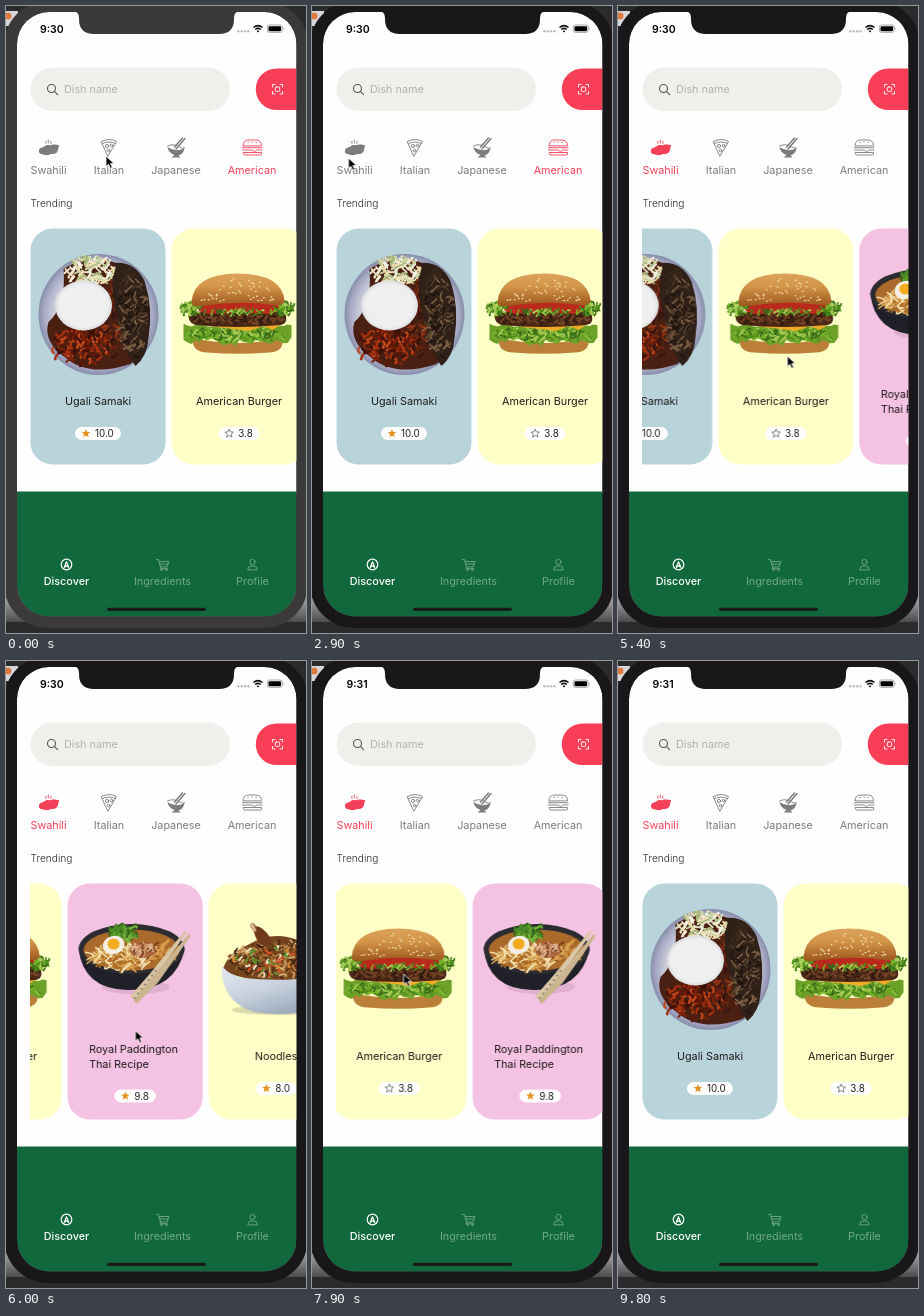
Write an HTML page that moves like this. It is 300 by 627 pixels and loops after 9.9 s.

```html
<!DOCTYPE html>
<html lang="en">
<head>
<meta charset="utf-8">
<title>Dish finder</title>
<style>
html, body { margin: 0; width: 100%; height: 100%; overflow: hidden; background: #2b2a2d; }
svg { display: block; width: 300px; height: 627px; }
text { font: 400 10.8px Inter, Roboto, sans-serif; }
.mid { text-anchor: middle; }
.small { font-size: 9.8px; }
.head { font-size: 10.2px; font-weight: 300; }
.line { fill: none; stroke: currentColor; stroke-width: .9; stroke-linecap: round; stroke-linejoin: round; }
.solid { fill: currentColor; }
.cat { color: #7c7c7c; }
.cat text, .tab text { fill: currentColor; }
.tab { color: #72a78a; }
.tab.on { color: #fff; }
.tab.on text { font-weight: 500; }
.clock { font-size: 10.5px; font-weight: 600; }
.anim { animation: 9900ms linear infinite; }
#body { animation-name: wake; animation-timing-function: step-end; }
#swahili { animation-name: pick; animation-timing-function: step-end; }
#american { animation-name: drop; animation-timing-function: step-end; }
#before { animation-name: before; animation-timing-function: step-end; }
#after { animation-name: after; animation-timing-function: step-end; }
#knob { animation-name: knob; animation-timing-function: step-end; }
#cards { animation-name: scroll; animation-timing-function: ease-in-out; }
#cursor { animation-name: point; animation-timing-function: ease-in-out; }
@keyframes wake { 0% { fill: #3b393a; } 5.05%, 100% { fill: #19171a; } }
@keyframes pick { 0% { color: #7c7c7c; } 31.31%, 100% { color: #f5405a; } }
@keyframes drop { 0% { color: #f5405a; } 31.31%, 100% { color: #7c7c7c; } }
@keyframes before { 0% { opacity: 1; } 75.76%, 100% { opacity: 0; } }
@keyframes after { 0% { opacity: 0; } 75.76%, 100% { opacity: 1; } }
@keyframes knob { 0% { opacity: 0; } 83.84% { opacity: 1; } 88.89%, 100% { opacity: 0; } }
@keyframes scroll {
  0%, 51.52% { transform: translateX(0); animation-timing-function: ease-in; }
  54.55% { transform: translateX(-65px); animation-timing-function: ease-out; }
  64.65%, 71.72% { transform: translateX(-294px); }
  76.77% { transform: translateX(-160px); animation-timing-function: ease-out; }
  79.8% { transform: translateX(-146px); animation-timing-function: linear; }
  85.86% { transform: translateX(-33px); animation-timing-function: ease-out; }
  90.9%, 100% { transform: translateX(0); }
}
@keyframes point {
  0%, 4% { transform: translate(100px, 150px); }
  25.25%, 33.33% { transform: translate(36.5px, 152px); }
  46.46%, 51.52% { transform: translate(235px, 350px); animation-timing-function: ease-in; }
  54.55% { transform: translate(169.5px, 350px); animation-timing-function: ease-out; }
  57.58% { transform: translate(110px, 357px); }
  63.64%, 67.68% { transform: translate(148.5px, 382px); }
  71.72% { transform: translate(66px, 330px); }
  76.77% { transform: translate(140px, 320px); }
  79.8% { transform: translate(91.5px, 313px); animation-timing-function: linear; }
  85.86% { transform: translate(168px, 336px); animation-timing-function: ease-out; }
  90.9% { transform: translate(196px, 330px); }
  96.97%, 100% { transform: translate(262px, -25px); }
}
</style>
</head>
<body>
<svg viewBox="0 0 300 627">
  <defs>
    <clipPath id="screen"><rect x="11" y="6" width="279.5" height="604.5" rx="32"/></clipPath>
    <clipPath id="list"><rect x="24.5" y="222" width="266" height="238"/></clipPath>
    <linearGradient id="shade" x2="0" y2="1"><stop offset=".1" stop-color="#b5b4b6"/><stop offset="1" stop-color="#4c4b4e"/></linearGradient>
    <linearGradient id="bun" x2="0" y2="1"><stop stop-color="#dca35c"/><stop offset=".4" stop-color="#d29548"/><stop offset="1" stop-color="#9c551d"/></linearGradient>
    <linearGradient id="bowl" x2=".7" y2="1"><stop stop-color="#e4eaf2"/><stop offset=".5" stop-color="#c9d3df"/><stop offset="1" stop-color="#98a5b8"/></linearGradient>
    <radialGradient id="plate"><stop offset=".75" stop-color="#c9cad9"/><stop offset=".9" stop-color="#a9abc6"/><stop offset="1" stop-color="#878daa"/></radialGradient>
    <radialGradient id="mound"><stop offset=".85" stop-color="#efefef"/><stop offset="1" stop-color="#dcdcdf"/></radialGradient>
  </defs>

  <rect width="300" height="627" fill="#2b2a2d"/>
  <path d="M0 5H12V20H0Z" fill="#d8d7d9"/>
  <path d="M0 585H300V616H0Z" fill="url(#shade)"/>
  <circle cx="2" cy="10" r="3.5" fill="#e0793f"/>
  <g id="body" class="anim">
    <rect x="-2" y="-5" width="304" height="627" rx="44"/>
  </g>

  <g clip-path="url(#screen)">
    <rect x="11" y="6" width="280" height="482" fill="#fffefe"/>
    <rect x="24.5" y="61.5" width="199.5" height="43.5" rx="21.75" fill="#f0efeb"/>
    <g class="line" style="color:#555;stroke-width:1.1"><circle cx="45.5" cy="82.5" r="4"/><path d="M48.6 85.6 51.6 88.6"/></g>
    <text x="58" y="87" fill="#b3b1af">Dish name</text>
    <path d="M292 62.5H270.5a20.75 20.75 0 0 0 0 41.5H292Z" fill="#f93f57"/>
    <g class="line" style="color:#fff">
      <path d="M266.5 81v-2.5h2.5M274 78.5h2.5V81M276.5 85.5v2.5H274M269 88h-2.5v-2.5"/>
      <rect x="269.3" y="81" width="4.4" height="4.5" rx="1"/>
    </g>

    <g id="swahili" class="cat anim">
      <path class="solid" d="M33 144c1-3 4-2 6-4 2-2 4 0 6-1 4-1 5 0 8 0 0 2-1 3-1 5-1 4-4 4-7 4-4 2-7 1-9 0-3 0-3-2-3-4Z"/>
      <path class="line" d="M40 137.500q-1.200-1.200 0-2.300M42.500 137q-1.200-1.500 0-3M45 137.500q-1.200-1.200 0-2.300"/>
      <text class="mid" x="42.500" y="168">Swahili</text>
    </g>
    <g class="cat">
      <path class="line" d="M95.500 135.500Q103 131.500 110.500 135.500L102 150Z M96.500 137.500Q103 134.500 109.500 137.500"/>
      <g class="line"><circle cx="101" cy="140" r="1.600"/><circle cx="105.500" cy="139.500" r="1.300"/><circle cx="102.500" cy="144.500" r="1.300"/></g>
      <text class="mid" x="103" y="168">Italian</text>
    </g>
    <g class="cat">
      <path class="line" style="stroke-width:1.500" d="M179 132.500 170 143M176.500 132 168.500 141"/>
      <path class="line" d="M161.500 140q6-3 12 1 4 2 5 1"/>
      <path class="solid" d="M161.500 141q8 6 17 1-1 6-6 7.500l2 2h-9l3-2.500q-6-2-7-8Z"/>
      <text class="mid" x="170" y="168">Japanese</text>
    </g>
    <g id="american" class="cat anim">
      <path class="line" d="M237 139.500q0-5.500 6-5.500h6.500q6 0 6 5.500ZM236.500 141.700h19.500M236.500 144h10l2 2 2-2h5.500M237.500 146.500h18v1.500q0 1-1 1h-16q-1 0-1-1Z"/>
      <path class="line" d="M242 136.500h.4M246 136h.4M250 136.500h.4"/>
      <text class="mid" x="246" y="168">American</text>
    </g>

    <text class="head" x="24.500" y="201" fill="#2c2a2b">Trending</text>
    <g clip-path="url(#list)"><g id="cards" class="anim"></g></g>

    <rect x="11" y="485.500" width="280" height="126" fill="#11683c"/>
    <g class="tab on">
      <circle class="line" cx="60.500" cy="558.500" r="5.300" style="stroke-width:1.200"/>
      <path class="line" style="stroke-width:1.200" d="M58.300 561.300 60.500 555.700 62.700 561.300 60.500 559.800Z"/>
      <text class="mid" x="60.500" y="579">Discover</text>
    </g>
    <g class="tab">
      <path class="line" d="M150.500 553.500h2l2 7.500h6.500l2-5.500h-10M153.500 558h8.500M154.500 561l-.5 1.700h7.500"/>
      <circle class="line" cx="155.500" cy="563.800" r=".8"/><circle class="line" cx="160.500" cy="563.800" r=".8"/>
      <text class="mid" x="156.500" y="579">Ingredients</text>
    </g>
    <g class="tab">
      <circle class="line" cx="246.500" cy="556" r="2.600"/>
      <path class="line" d="M241.800 563.500q0-3.500 3.200-3.500h3q3.200 0 3.200 3.500Z"/>
      <text class="mid" x="246.500" y="579">Profile</text>
    </g>
    <rect x="101" y="601.700" width="99" height="3.200" rx="1.600" fill="#171c19"/>

    <text id="before" class="clock anim" x="34" y="26.700">9:30</text>
    <text id="after" class="clock anim" x="34.500" y="26.700">9:31</text>
    <g fill="#bcbcbc"><circle cx="232.300" cy="25.300" r="1.200"/><circle cx="235.700" cy="25.300" r="1.200"/><circle cx="239.100" cy="25.300" r="1.200"/><circle cx="242.500" cy="25.300" r="1.200"/></g>
    <g class="line" style="color:#111;stroke-width:1.500;stroke-linecap:butt"><path d="M247.500 21.500q4.500-3.800 9 0M249.200 23.500q2.800-2.300 5.600 0"/></g>
    <path d="M250.600 25q1.400-1.200 2.800 0L252 26.500Z"/>
    <rect x="261.300" y="19" width="15" height="7.400" rx="2.200" fill="none" stroke="#888" stroke-width=".7"/>
    <rect x="262.500" y="20.200" width="12.600" height="5" rx="1.200"/><path d="M277.300 21.300q1.300 1.400 0 2.800Z" fill="#888"/>
  </g>
  <path id="notch" d="M67 5q6 .5 6 7v1q0 15 15 15H213q15 0 15-15v-1q0-6.500 6-7Z"/>

  <circle id="knob" class="anim" cx="302" cy="292" r="17.500" fill="#1b1a1d" stroke="#434246"/>
  <path id="cursor" class="anim" d="M0 0V10.500L2.500 8.300 4.300 12.300 6.300 11.400 4.500 7.600H8Z" stroke="#fff" stroke-width=".8"/>
</svg>
<script>
let seed = 7;
const rand = () => (seed = seed * 16807 % 2147483647) / 2147483647;
const $ = id => document.getElementById(id);
const path = (d, fill, extra = '') => `<path d="${d}" fill="${fill}" ${extra}/>`;
const oval = (x, y, rx, ry, fill, extra = '') =>
  `<ellipse cx="${x}" cy="${y}" rx="${rx}" ry="${ry}" fill="${fill}" ${extra}/>`;

// Short curved strokes spread over an ellipse.
function scatter(x, y, rx, ry, n, len, width, colors) {
  let out = '';
  for (let i = 0; i < n; i++) {
    const a = rand() * 6.283, r = Math.sqrt(rand()), turn = rand() * 6.283;
    const px = x + rx * r * Math.cos(a), py = y + ry * r * Math.sin(a);
    const dx = len * Math.cos(turn), dy = len * Math.sin(turn);
    const color = colors[Math.floor(rand() * colors.length)];
    out += `<path d="M${(px - dx / 2).toFixed(1)} ${(py - dy / 2).toFixed(1)}q${(dy / 2).toFixed(1)} ${(dx / 2).toFixed(1)} ${dx.toFixed(1)} ${dy.toFixed(1)}" fill="none" stroke="${color}" stroke-width="${width}" stroke-linecap="round"/>`;
  }
  return out;
}

// Leafy band with wavy edges.
function lettuce(x0, x1, y, h, fill) {
  let top = '', low = '';
  for (let x = x0; x <= x1; x += 4) {
    const bend = Math.abs(x - (x0 + x1) / 2) / (x1 - x0) * 5;
    top += `L${x} ${(y - bend * .6 - rand() * 3).toFixed(1)}`;
    low = `L${x} ${(y + h - bend + (rand() - .5) * 7).toFixed(1)}` + low;
  }
  return path('M' + top.slice(1) + low + 'Z', fill);
}

const greens = ['#79b52b', '#a9ce58', '#4b8a1c', '#38691a'];

function ugali() {
  return oval(68, 308.500, 60, 60.500, 'url(#plate)')
    + path('M33 263Q60 246 88 258Q116 262 118 300Q120 340 100 358Q58 372 34 351Q12 335 18 316Q36 300 33 263Z', '#4a2013')
    + scatter(51, 341, 32, 18, 130, 5, 2.200, ['#a5320f', '#5f1608', '#c2481c', '#7d220b', '#3f1008'])
    + scatter(84, 312, 10, 38, 60, 6, 2, ['#6b2410', '#8f3413', '#351510'])
    + path('M84 257Q104 255 114 275Q123 302 118 332Q117 350 105 360Q92 345 90 322Q78 285 84 257Z', '#2f2018')
    + scatter(102, 306, 14, 46, 110, 8, 1.500, ['#1d1410', '#55402d', '#7d6045', '#3a281c'])
    + scatter(60, 265, 24, 14, 120, 6, 1.800, ['#f4f4e8', '#ccd6a6', '#e8e6cf', '#a9b97d', '#f3dfb4'])
    + oval(53, 299.500, 28.500, 25, 'url(#mound)');
}

function burger() {
  let seeds = '';
  for (let i = 0; i < 46; i++) {
    const a = 3.3 + rand() * 2.8, r = .35 + rand() * .58;
    seeds += oval((66.5 + 43 * r * Math.cos(a)).toFixed(1), (299 + 30 * r * Math.sin(a)).toFixed(1), 1.1, .8, '#f3d9a5');
  }
  return path('M21 332Q66 342 111 332Q113 346 97 346.500Q67 349 36 346.500Q20 346 21 332Z', '#bb7f39')
    + lettuce(12, 121, 322, 15, '#6da028') + scatter(67, 328, 51, 6, 110, 6, 1.500, greens)
    + path('M18 317L112 317 101 324 92 320 78 325 45 321Z', '#f0ab26')
    + path('M19 306Q67 303 113 306Q118 317 109 319Q66 323 24 319Q14 315 19 306Z', '#4a2817')
    + scatter(67, 313, 45, 5, 90, 4, 1.600, ['#7b4828', '#2f1910', '#66391f'])
    + path('M25 299Q66 293 111 298Q111 306 95 308Q66 305 38 308Q24 306 25 299Z', '#b92a1c')
    + scatter(20, 302, 10, 6, 40, 6, 1.700, greens) + scatter(112, 302, 9, 6, 40, 6, 1.700, greens)
    + scatter(67, 306, 38, 2, 35, 5, 1.400, greens)
    + path('M20 297Q21 268 66.500 267.500Q111 268 113 295Q113 300 102 299Q67 294 31 300Q20 301 20 297Z', 'url(#bun)') + seeds;
}

function ramen() {
  let dots = '';
  for (let i = 0; i < 7; i++) dots += oval(67 + i * 3.500, 337 - i * 4.500, 1.100, 1.100, '#8d8371');
  return oval(68, 326, 34, 7, '#cf9fc0', 'opacity=".5"')
    + path('M11 287Q15 328 60 329Q108 330 117 288Z', '#202128')
    + oval(64, 288, 53, 25, '#2b2b31') + oval(64, 289, 48, 20.500, '#a96a2b')
    + scatter(56, 296, 34, 11, 110, 11, 1.500, ['#efd596', '#d9a452', '#f6e4b5', '#b07026'])
    + scatter(92, 291, 17, 11, 30, 5, 2, ['#7b3f16', '#c98a3c', '#d9a452'])
    + scatter(56, 271, 14, 7, 55, 7, 2, ['#4b8b26', '#74b53a', '#2e641a'])
    + oval(46, 284, 11, 9, '#f4efe2', 'transform="rotate(-15 46 284)"') + oval(46, 283, 6, 5.500, '#f3ac20')
    + oval(75, 289, 13, 8, '#a9663c') + scatter(75, 288, 10, 6, 30, 6, 1.500, ['#cf966c', '#7d432a', '#e0b591'])
    + path('M117 270L119.500 271 86 318 68 339 62 336 82 313Z', '#d9c6a4')
    + path('M121 273L123 275 90 322 69 343 66 339Z', '#cbb490') + dots;
}

function noodles() {
  return oval(71, 349, 48, 5, '#dcdcaa')
    + path('M14 310Q17 294 39 284Q69 266 99 284Q119 292 122 309Q70 332 14 310Z', '#74451f')
    + scatter(69, 298, 47, 17, 240, 7, 1.600, ['#b77d40', '#4b2a13', '#dcb678', '#6b3c1a', '#a0642c', '#39200f'])
    + scatter(69, 300, 45, 15, 60, 4, 2, ['#d4542a', '#5f8c2d', '#e58d36', '#efe2c0'])
    + path('M42 263q4-2 5 2 8 1 14 11 4 8-4 9-9-1-12-16-4-2-3-6Z', '#6e3a1b')
    + path('M42 263q4-1 4 2l2 5-3 1q-4-4-3-8Z', '#d6b285')
    + path('M13 305Q22 315 35 317Q70 321 106 316Q119 313 125 303Q128 339 95 351Q70 355 45 351Q12 340 13 305Z', 'url(#bowl)');
}

function star(x, y, filled) {
  let d = '';
  for (let i = 0; i < 10; i++) {
    const a = i * Math.PI / 5, r = i % 2 ? 2 : 4.5;
    d += (i ? 'L' : 'M') + (x + r * Math.sin(a)).toFixed(2) + ' ' + (y - r * Math.cos(a)).toFixed(2);
  }
  return path(d + 'Z', filled ? '#e2921f' : 'none', filled ? '' : 'stroke="#555" stroke-width=".7"');
}

function card([color, food, lines, score, filled], i) {
  const wide = lines.length > 1, y = wide ? 435 : 427.5, w = score.length > 3 ? 46 : 41.5;
  const left = 67.5 - w / 2;
  const name = lines.map((s, k) => wide
    ? `<text x="21.5" y="${391.5 + 15 * k}">${s}</text>`
    : `<text class="mid" x="67.5" y="399">${s}</text>`).join('');
  return `<g transform="translate(${24.5 + 141 * i} 0)">
    <rect y="222.5" width="135" height="236" rx="22" fill="${color}"/>${food()}<g fill="#1f1b1c">${name}</g>
    <rect x="${left}" y="${y - 6.5}" width="${w}" height="13" rx="6.5" fill="#fffefe"/>
    ${star(left + 11, y, filled)}<text class="small" x="${left + 20}" y="${y + 3.7}" fill="#222">${score}</text></g>`;
}

$('cards').innerHTML = [
  ['#b8d4da', ugali, ['Ugali Samaki'], '10.0', true],
  ['#feffc6', burger, ['American Burger'], '3.8', false],
  ['#f4c2e2', ramen, ['Royal Paddington', 'Thai Recipe'], '9.8', true],
  ['#feffc6', noodles, ['Noodles'], '8.0', true]
].map(card).join('');
$('body').append($('notch'));
// The notch shares the body's colour but sits above the screen.
$('body').before(document.querySelector('[clip-path="url(#screen)"]'));
$('body').firstElementChild.outerHTML =
  '<path fill-rule="evenodd" d="M42-5H258a44 44 0 0 1 44 44V578a44 44 0 0 1-44 44H42a44 44 0 0 1-44-44V39a44 44 0 0 1 44-44Z'
  + 'M43 6a32 32 0 0 0-32 32V578.5a32 32 0 0 0 32 32H258.5a32 32 0 0 0 32-32V38a32 32 0 0 0-32-32Z"/>';
</script>
</body>
</html>
```
